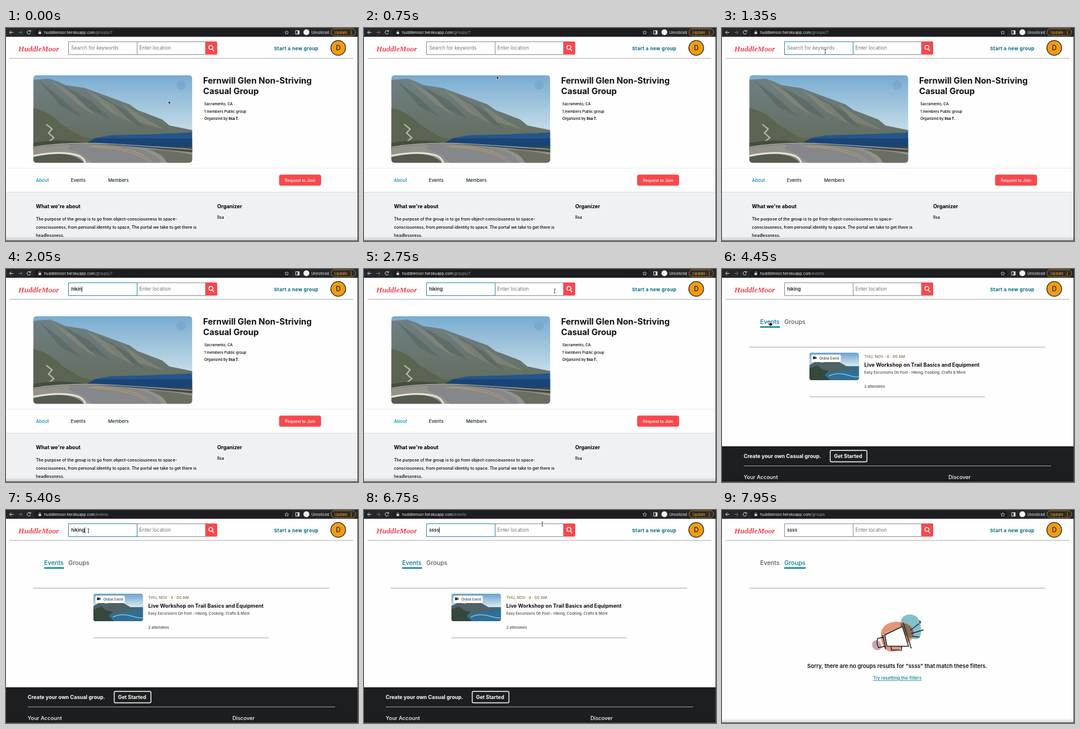
An HTML page that plays this animation: 600x364 px, repeating every 8 s.

```html
<!DOCTYPE html>
<html lang="en">
<head>
<meta charset="utf-8">
<title>Group search</title>
<style>
  html, body { margin: 0; width: 100%; height: 100%; overflow: hidden; background: #fefefe; }
  svg { display: block; width: 100vw; height: 100vh; font-family: Inter, "Open Sans", sans-serif; font-weight: 500; }
  text { white-space: pre; }
  .r { font-weight: 400; }
  .s { font-weight: 600; }
  .b { font-weight: 700; }
  .line { fill: none; stroke: #a5a5a5; stroke-width: 1; }
  .ink { fill: none; stroke: #1f2330; stroke-width: 1.5; stroke-linecap: round; stroke-linejoin: round; }
  .icon { fill: none; stroke: #dcdde0; stroke-width: 1; }
  .pointer { stroke: #fff; stroke-width: .6; fill: #111; }
</style>
</head>
<body>
<svg viewBox="0 0 600 364">
  <defs>
    <linearGradient id="sky" x1="0" y1="0" x2="0" y2="1">
      <stop offset="0" stop-color="#78abd0"/><stop offset=".62" stop-color="#c3dbe7"/>
    </linearGradient>
    <linearGradient id="hill" x1="0" y1="0" x2="0" y2="1">
      <stop offset="0" stop-color="#6f7f83"/><stop offset="1" stop-color="#626b5a"/>
    </linearGradient>
    <linearGradient id="haze" x1="0" y1="0" x2="0" y2="1">
      <stop offset="0" stop-color="#69a3d0"/><stop offset=".5" stop-color="#dfebf0"/>
    </linearGradient>
    <linearGradient id="shade" x1="0" y1="0" x2="0" y2="1">
      <stop offset="0" stop-opacity="0"/><stop offset="1" stop-opacity=".18"/>
    </linearGradient>
    <clipPath id="photoClip"><rect width="271" height="150" rx="6"/></clipPath>
    <clipPath id="thumbClip"><rect x="149" y="143" width="84.5" height="47" rx="4"/></clipPath>

    <g id="coast" clip-path="url(#photoClip)">
      <rect width="271" height="150" fill="url(#sky)"/>
      <circle cx="252" cy="17" r="8" fill="#6698c0" opacity=".4"/>
      <path d="M70 96H271V132H70Z" fill="#24558c"/>
      <path d="M70 108H271V132H70Z" fill="#1a4476"/>
      <path d="M0 8 28 6 42 11 55 17 88 22 126 36 164 50 178 60 192 65 220 76 232 86 271 94V98L200 101 130 103 104 108 86 117 0 130Z" fill="url(#hill)"/>
      <path d="M10 10 44 36 84 72 48 54ZM52 18 98 44 132 76 90 56ZM112 34 160 62 192 92 146 70Z" fill="#55645f" opacity=".6"/>
      <path d="M28 8 70 34 108 70 76 50ZM88 24 136 50 172 84 130 62ZM150 48 190 74 226 94 180 80Z" fill="#938f80" opacity=".5"/>
      <path d="M0 56Q28 62 48 84L84 106 104 109 86 118 0 128Z" fill="#5b6450"/>
      <path d="M22 84l10 8-6 7 9 8-10 8 12 8" fill="none" stroke="#b8b9ae" stroke-width="2.2"/>
      <path d="M0 116Q40 108 86 115L150 120 210 124 271 122V136H0Z" fill="#444e40"/>
      <path d="M0 124Q60 116 110 118 176 122 271 132V150H0Z" fill="#93928b"/>
      <path d="M64 119Q140 116 188 128 212 136 218 150H100L84 136 60 126Z" fill="#85878a"/>
      <path d="M100 121Q180 122 204 150M94 122Q176 126 199 150" fill="none" stroke="#caa35b" stroke-width=".9"/>
      <path d="M0 140Q66 126 86 150H0Z" fill="#555a4d"/>
      <path d="M0 138Q50 128 78 138 86 142 89 150" fill="none" stroke="#e4e2da" stroke-width="3"/>
      <path d="M0 123Q60 113 140 118T271 127" fill="none" stroke="#bdbcb5" stroke-width="1.2"/>
      <path d="M194 127Q236 128 271 136V150H228Q222 134 194 127Z" fill="#6b6e62"/>
    </g>
    <g id="cove" clip-path="url(#thumbClip)">
      <rect x="149" y="143" width="85" height="47" fill="url(#haze)"/>
      <path d="M149 166H234V190H149Z" fill="#2f6f98"/>
      <path d="M149 164 160 158 172 160 184 155 200 159 212 166 234 172 206 173 184 178 166 181 149 184Z" fill="#4e6268"/>
      <path d="M149 170 162 165 172 172 182 174 175 181 184 190H149Z" fill="#34483c"/>
      <path d="M182 183Q196 176 213 181T234 184" fill="none" stroke="#8fb8c7" stroke-width="1.5"/>
    </g>
    <g id="footer">
      <path d="M0 0H600V70H0Z" fill="#1c1e1f"/>
      <g fill="#fff">
        <text class="b" x="37" y="20.3" font-size="8.75">Create your own Casual group.</text>
        <text class="b" x="191" y="20.3" font-size="8.6">Get Started</text>
        <text x="37" y="55.8" font-size="9">Your Account</text>
        <text x="386" y="55.8" font-size="9">Discover</text>
      </g>
      <rect x="184.5" y="7" width="62.5" height="19.5" rx="2" fill="none" stroke="#fff" stroke-width="1.4"/>
      <path class="line" d="M37 33.5H561"/>
    </g>
  </defs>

  <rect width="600" height="364" fill="#fefefe"/>

  <g id="group">
    <use href="#coast" transform="translate(46.5 80.5)"/>
    <g class="b" font-size="14.4" fill="#111">
      <text x="336" y="95">Fernwill Glen Non-Striving</text>
      <text x="336" y="113">Casual Group</text>
    </g>
    <g font-size="6.25" fill="#000">
      <text x="338" y="132">Sacramento, CA</text>
      <text x="338" y="144.6">1 members Public group</text>
      <text x="338" y="157.2">Organized by <tspan class="b">Ilsa T.</tspan></text>
    </g>
    <path class="line" d="M0 239.5H599" style="stroke:#ededee"/>
    <g font-size="7.8" fill="#16282f">
      <text x="51" y="263" fill="#0d8db4">About</text>
      <text x="110.5" y="263">Events</text>
      <text x="174" y="263">Members</text>
    </g>
    <rect x="465.5" y="250.5" width="71.5" height="19" rx="3.5" fill="#f8484c"/>
    <text x="475.3" y="262.5" font-size="7" fill="#fff">Request to Join</text>
    <path d="M0 280H599V363H0Z" fill="#f0f1f3"/>
    <path class="line" d="M0 280.5H599" style="stroke:#dcdde0"/>
    <g class="b" font-size="8.8" fill="#000">
      <text x="51" y="307.6">What we're about</text>
      <text x="360" y="307.6">Organizer</text>
    </g>
    <g font-size="7.05" fill="#000">
      <text x="51" y="328.8">The purpose of the group is to go from object-consciousness to space-</text>
      <text x="51" y="342.8">consciousness, from personal identity to space. The portal we take to get there is</text>
      <text x="51" y="356.8">headlessness.</text>
      <text x="360" y="326.3">Ilsa</text>
    </g>
  </g>

  <g id="tabs" font-size="10.3">
    <text id="eventsTab" x="65" y="94">Events</text>
    <text id="groupsTab" x="106.3" y="94">Groups</text>
    <rect id="underline" y="98" height="2.2" rx=".6" fill="#007a92"/>
    <path class="line" d="M46 133.5H551"/>
  </g>

  <g id="groups">
    <use href="#coast" transform="translate(149 143) scale(.3125)"/>
    <g class="b" font-size="8.95" fill="#111">
      <text x="251" y="154.7">Easy Excursions On Foot - Hiking, Cooking,</text>
      <text x="251" y="165.5">Crafts &amp; More</text>
    </g>
    <text class="s" x="251" y="176.2" font-size="6.4" fill="#85735a">Flagstaff, AZ</text>
    <g font-size="6.3" fill="#5b5b5b">
      <text x="251" y="192">Our meetups include hikes,biking, dancing,Classes, picnics,</text>
      <text x="251" y="201.6">sport games, concerts, happy hour, and whatever else that</text>
      <text x="251" y="219">5 members · In person</text>
    </g>
    <path class="line" d="M149 227.5H448"/>
    <use href="#footer" y="312"/>
  </g>

  <g id="events">
    <use href="#cove"/>
    <rect x="152.5" y="146.5" width="50" height="12.5" rx="2" fill="#fff"/>
    <path d="M155 149.5h4.2v1.5l2-1v3.6l-2-1v1.5H155Z" fill="#333"/>
    <text x="166" y="154.9" font-size="5.6" fill="#444">Online Event</text>
    <text x="242.5" y="152" font-size="6.7" fill="#8a6c3c">THU, NOV · 4 : 00 AM</text>
    <text class="b" x="242.5" y="166.6" font-size="8.9" fill="#111">Live Workshop on Trail Basics and Equipment</text>
    <g font-size="6.3" fill="#484848">
      <text x="242.5" y="178.9">Easy Excursions On Foot - Hiking, Cooking, Crafts &amp; More</text>
      <text x="242.5" y="203">2 attendees</text>
    </g>
    <path class="line" d="M149 218.5H448"/>
    <use href="#footer" y="303"/>
  </g>

  <g id="empty">
    <path d="M304 195Q305 179 320 178.5 335 179 338 194 342 216 334 220 324 223 313 214 304 207 304 195Z" fill="#86c0cb"/>
    <path d="M271 210Q274 193 296 191 326 190 327 212 326 223 312 229 302 243 287 242 270 239 271 210Z" fill="#e19877"/>
    <path d="M304 193Q325 193 327 212 325 219 320 219 304 209 304 193Z" fill="#876f56"/>
    <path d="M257 226Q261 220 268 224 274 232 271 238 262 242 257 235 255 230 257 226Z" fill="#c9a3b0"/>
    <path class="ink" d="M277.5 213.5 307.5 199 318 233 281 232.5Z" style="fill:#fefefe"/>
    <path class="ink" d="M309 193 322.5 236M274 214.5 279 237M275 217 265 220Q263 229 267 235L278 233M288 233.5 289 239.5H306V233.5M321 205.5 337 193.5M323 211 343 205M324 216 336 217"/>
    <text class="s" x="298.7" y="270" font-size="9.3" fill="#111" text-anchor="middle">Sorry, there are no groups results for "ssss" that match these filters.</text>
    <text x="298.7" y="290" font-size="7.6" fill="#0b7f95" text-anchor="middle" text-decoration="underline">Try resetting the filters</text>
  </g>

  <g id="header">
    <text x="21" y="39.5" font-family="'Liberation Serif', serif" font-size="13" font-weight="700" font-style="italic" fill="#f0444c">HuddleMoor</text>
    <path d="M106.5 23.5H340V45.5H106.5ZM223.5 23.5V45.5" fill="#fff" stroke="#8c8c8c"/>
    <rect id="focus" x="106.5" y="23.5" width="117" height="22" rx="1.5" fill="#fff" stroke="#2b87a7"/>
    <text id="query" x="111" y="37.2"/>
    <path id="caret" d="M0 29.5V39.5" stroke="#111" stroke-width=".8"/>
    <text class="r" x="227.3" y="37.2" font-size="8.3" fill="#757575">Enter location</text>
    <path id="button" d="M340 23H358Q360 23 360 25V43.5Q360 45.5 358 45.5H340Z"/>
    <path d="M351.5 36 354.5 39.3M352.7 33.2A3.4 3.4 0 1 1 345.9 33.2 3.4 3.4 0 1 1 352.7 33.2" fill="none" stroke="#fff" stroke-width="1.4"/>
    <text class="b" x="457" y="37.5" font-size="8" letter-spacing=".38" fill="#006a80">Start a new group</text>
    <circle cx="566.3" cy="34" r="12.6" fill="#f09c10" stroke="#222" stroke-width="1.3"/>
    <text x="566.3" y="38.2" font-size="11.5" fill="#222" text-anchor="middle">D</text>
    <path class="line" d="M6 52H592"/>
  </g>

  <g id="browser" class="r">
    <path d="M0 0H600V15H0Z" fill="#26272a"/>
    <rect x="48" y="1" width="439" height="12.5" rx="6" fill="#1c1d20"/>
    <path class="icon" d="M12.5 7.5H6.5M9 4.5 6 7.5 9 10.5M41.3 5.5A3 3 0 1 0 41.7 8.5M42 3.5V6H39.5M493.8 4.5h6v6h-6Z"/>
    <path class="icon" d="M21 7.5H27M24.5 4.5 27.5 7.5 24.5 10.5" style="stroke:#737478"/>
    <path d="M497 4.5H500V10.5H497ZM55.5 7H59.8V10.3H55.5Z" fill="#dcdde0"/>
    <path class="icon" d="M56.3 7V5.5Q57.6 3.5 59 5.5V7" style="stroke-width:.8"/>
    <path class="icon" d="M478.5 4.3l1 2.2 2.3.2-1.8 1.6.6 2.3-2.1-1.2-2.1 1.2.6-2.3-1.8-1.6 2.3-.2Z" style="stroke-width:.7"/>
    <text x="65" y="9.8" font-size="6.5" fill="#f1f1f2">huddlemoor.herokuapp.com<tspan id="path" fill="#999b9f"></tspan></text>
    <circle cx="512" cy="7.3" r="5" fill="#f1f1f2"/>
    <text x="520.5" y="9.8" font-size="6.2" fill="#f1f1f2">Unnoticed</text>
    <rect x="554" y="1.2" width="42" height="12" rx="6" fill="#302a20" stroke="#c78b36" stroke-width=".8"/>
    <text x="560" y="9.7" font-size="6.3" fill="#f5ae4a">Update</text>
    <path d="M588.5 4.5V11" stroke="#f5ae4a" stroke-width="1.2" stroke-dasharray="1.2 1.3"/>
    <path d="M0 356H600V364H0Z" fill="url(#shade)"/>
    <path d="M599.5 15V364M0 363.5H600" stroke="#4a4b4e"/>
  </g>

  <g id="cursor">
    <path id="arrow" class="pointer" d="M0 0V6.2L1.4 5 2.5 7.5 3.6 7 2.5 4.6H4.5Z"/>
    <path id="beam" d="M-1.5-3.5Q0-3.5 0-2.5 0-3.5 1.5-3.5M0-2.5V2.5M-1.5 3.5Q0 3.5 0 2.5 0 3.5 1.5 3.5" fill="none" stroke="#222" stroke-width=".8"/>
    <path id="hand" class="pointer" d="M-.8-1.5Q0-2.5.8-1.5V1L3.8 1.8Q4.3 2.2 4 4L3.2 6H-1L-3.2 2.8Q-2.8 1.6-.8 3Z"/>
  </g>
</svg>
<script>
const DURATION = 8000;
const $ = id => document.getElementById(id);
const show = (id, on) => $(id).style.display = on ? "" : "none";
const within = (v, a, b) => v >= a && v < b;

// [time, x, y] stops of the pointer
const STOPS = [
  [0, 277, 124], [500, 277, 124], [1000, 176, 40], [2250, 176, 40],
  [2900, 348, 37], [3450, 348, 37], [4150, 82, 91], [4600, 82, 91],
  [5200, 140.5, 35.5], [6500, 140.5, 35.5], [6750, 304, 24],
  [7000, 349, 36], [7350, 349, 36], [7850, 336, 187.5], [8000, 336, 187.5]
];
const PAGES = [
  [0, "group", "/groups/7"], [3150, "groups", "/groups"],
  [4350, "events", "/events"], [7350, "empty", "/groups"]
];
const FOCUS = [[800, 3000], [5250, 7250]];

function pointerAt(t) {
  const i = STOPS.findIndex(stop => stop[0] > t);
  const [t0, x0, y0] = STOPS[i - 1], [t1, x1, y1] = STOPS[i];
  const p = (t - t0) / (t1 - t0), e = p * p * (3 - 2 * p);
  return [x0 + (x1 - x0) * e, y0 + (y1 - y0) * e];
}

function queryAt(t) {
  const steps = (start, gap) => Math.max(0, Math.floor((t - start) / gap) + 1);
  if (t < 5600) return "hiking".slice(0, steps(1600, 100));
  if (t < 6100) return "hiking".slice(0, Math.max(0, 6 - steps(5650, 60)));
  return "ssss".slice(0, steps(6100, 100));
}

function cursorKind(x, y, page) {
  if (within(y, 23, 46)) {
    if (within(x, 107, 340)) return "beam";
    if (within(x, 340, 361)) return "hand";
  }
  return page !== "group" && within(y, 83, 101) && within(x, 64, 143) ? "hand" : "arrow";
}

function drawPage(page, path) {
  for (const [, id] of PAGES) show(id, id === page);
  show("tabs", page !== "group");
  $("path").textContent = path;
  const onEvents = page === "events";
  $("eventsTab").setAttribute("fill", onEvents ? "#007a92" : "#5c5c5c");
  $("groupsTab").setAttribute("fill", onEvents ? "#5c5c5c" : "#007a92");
  $("underline").setAttribute("x", onEvents ? 65 : 106);
  $("underline").setAttribute("width", onEvents ? 34 : 36.5);
}

function drawQuery(t) {
  const text = queryAt(t), query = $("query");
  query.textContent = text || "Search for keywords";
  query.setAttribute("class", text ? "" : "r");
  query.setAttribute("font-size", text ? 8 : 8.3);
  query.setAttribute("fill", text ? "#000" : "#757575");

  const focus = FOCUS.find(([from, to]) => within(t, from, to));
  const typing = within(t, 1600, 2200) || within(t, 5600, 6400);
  const lastAction = t >= 6400 ? 6400 : t >= 2200 && t < 5250 ? 2200 : focus?.[0];
  show("focus", focus);
  show("caret", focus && (typing || (t - lastAction) % 1000 < 500));
  const width = text ? query.getComputedTextLength() : 0;
  $("caret").setAttribute("transform", `translate(${111.4 + width} 0)`);
}

function draw(t) {
  const [, page, path] = PAGES.findLast(([start]) => t >= start);
  drawPage(page, path);
  drawQuery(t);

  const [x, y] = pointerAt(t), kind = cursorKind(x, y, page);
  for (const id of ["arrow", "beam", "hand"]) show(id, id === kind);
  show("cursor", !within(t, 1600, 2250) && !within(t, 5650, 6500));
  $("cursor").setAttribute("transform", `translate(${x} ${y})`);
  $("button").setAttribute("fill", kind === "hand" && y < 50 ? "#e2575b" : "#f8484c");
}

const start = performance.now();
function tick() {
  draw((performance.now() - start) % DURATION);
  requestAnimationFrame(tick);
}
tick();
</script>
</body>
</html>
```
